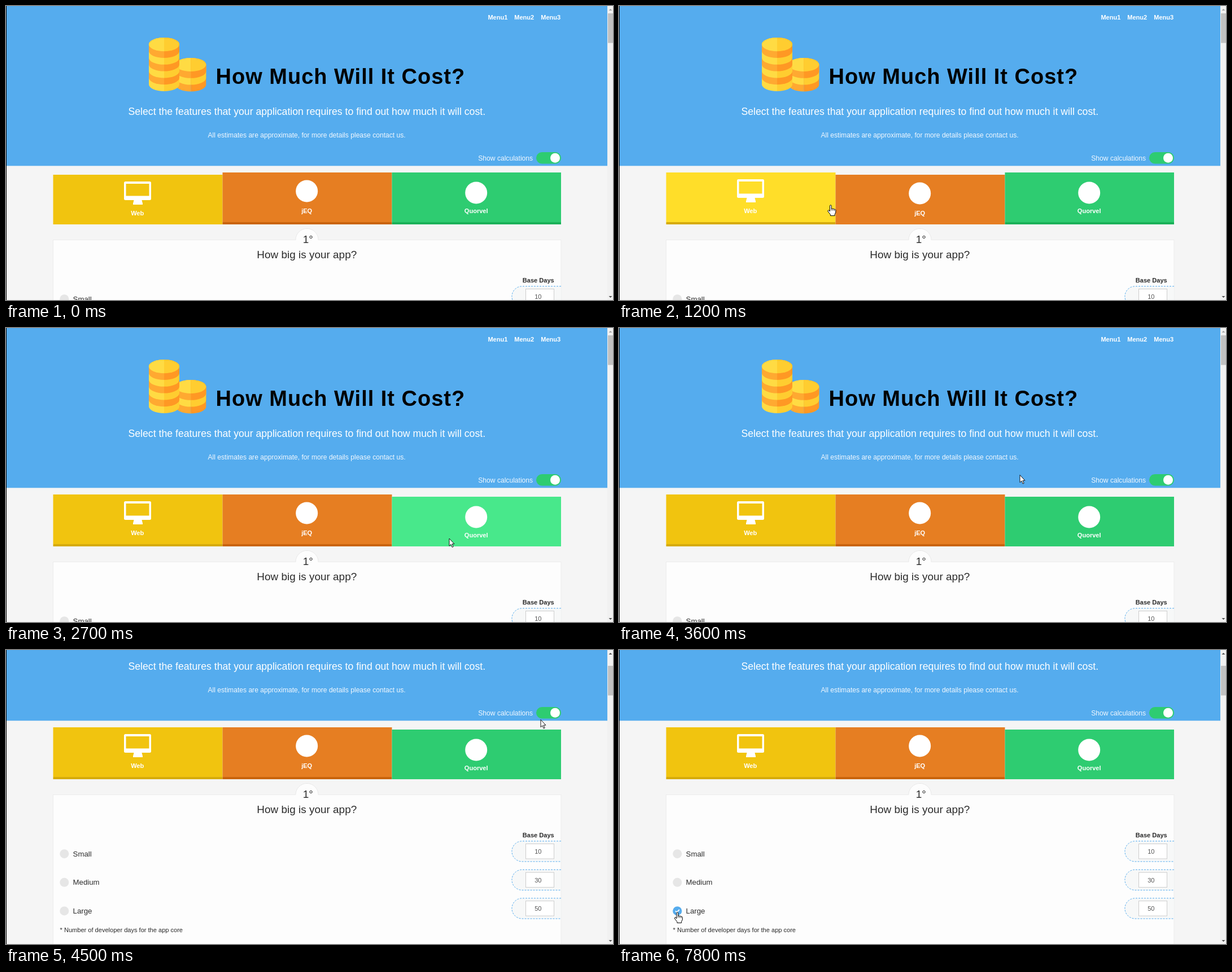
An HTML page for the animation above (8000 ms loop, 1075 px wide and 521 px high).

```html
<!DOCTYPE html>
<html lang="en">
<head>
<meta charset="utf-8">
<title>Cost calculator</title>
<style>
  html, body { margin: 0; width: 100%; height: 100%; overflow: hidden; background: #f5f5f5; }
  svg { display: block; width: 1075px; height: 521px; }
  text { font: 11.06px "Liberation Sans", Arial, sans-serif; fill: #2b2b2b; }
  .bold { font-weight: bold; }
  .light { fill: #fff; }
  .mid { text-anchor: middle; }
  .note { font-size: 12.1px; fill: #f2f8fe; }
  .label { font-size: 13.2px; }
  .big { font-size: 18.96px; }
</style>
</head>
<body>
<svg viewBox="0 0 1075 521">
  <rect width="1075" height="521" fill="#f5f5f5"/>
  <g id="page">
    <rect x="1" width="1064" height="283.3" fill="#55acee"/>
    <g class="menu">
      <text class="bold light" x="853.4" y="23.6">Menu1</text>
      <text class="bold light" x="900.2" y="23.6">Menu2</text>
      <text class="bold light" x="947.2" y="23.6">Menu3</text>
    </g>
    <g id="coins"></g>
    <text class="bold" x="371.5" y="138" style="font-size:38px;letter-spacing:1px;fill:#000">How Much Will It Cost?</text>
    <text class="mid light" x="532.8" y="192.6" style="font-size:17.68px">Select the features that your application requires to find out how much it will cost.</text>
    <text class="mid note" x="532.6" y="233">All estimates are approximate, for more details please contact us.</text>
    <text class="note" x="836.3" y="274">Show calculations</text>
    <rect id="track" x="939" y="259" width="44" height="20.5" rx="10.2"/>
    <rect id="knob" y="260.8" height="17" rx="8.5" fill="#fff"/>

    <g id="tabs"></g>

    <circle cx="533" cy="414.5" r="20" fill="#fdfdfd" stroke="#e6e6e6"/>
    <rect x="83.5" y="414.5" width="899.5" height="400" fill="#fdfdfd" stroke="#ececec"/>
    <circle cx="533" cy="414.5" r="19.5" fill="#fdfdfd"/>
    <text class="mid big" x="534.8" y="420">1°</text>
    <text class="mid big" x="532.8" y="447">How big is your app?</text>
    <g id="options"></g>
    <g id="days">
      <text class="bold" x="970.7" y="490.2" text-anchor="end">Base Days</text>
    </g>
    <g id="check">
      <circle cx="103.3" cy="620.4" r="8" fill="#55acee"/>
      <path d="M100 620.4l2.4 2.4l4.4 -4.7" fill="none" stroke="#fff" stroke-width="1.9"/>
    </g>
    <text x="95.6" y="657.6" font-style="italic">* Number of developer days for the app core</text>
  </g>

  <rect width="1" height="521" fill="#000"/>
  <rect x="1065" width="10" height="521" fill="#f1f1f1"/>
  <rect id="thumb" x="1066" width="9" height="52.5" fill="#c1c1c1"/>
  <path id="up" d="M1067.5 8h6l-3 -3z"/>
  <path d="M1067.5 514h6l-3 3z" fill="#505050"/>

  <g id="cursor" fill="#fff" stroke="#000" stroke-linejoin="round">
    <path id="arrow" stroke-width=".9" d="M0 0V13.2L3 10.4L5.2 15.5L7.2 14.6L5 9.7H9Z"/>
    <g id="hand">
      <path d="M-1.6 11V1.2a1.4 1.4 0 0 1 2.8 0V6.8a1.4 1.4 0 0 1 2.7 .3a1.4 1.4 0 0 1 2.6 .5a1.4 1.4 0 0 1 2.3 .9V13l-1.7 3.2V18.6H-.6V16.6L-4.9 11a1.5 1.5 0 0 1 2.2 -1.9z"/>
      <path d="M1.2 6.8V9.6M3.9 7.1V9.8M6.5 7.6V10" stroke-width=".8"/>
    </g>
  </g>
</svg>

<script>
const $ = id => document.getElementById(id);
const set = (id, attrs) => {
  for (const key in attrs) $(id).setAttribute(key, attrs[key]);
};
const show = (id, on) => set(id, { visibility: on ? 'visible' : 'hidden' });

const YELLOW = ['#ffdb43', '#ffcd30'], ORANGE = ['#ffa931', '#ff9824'];

// Each half of a stack has its own tone; bands are painted from the bottom up.
function coinStack(cx, top, bands) {
  const rx = 27, ry = 12, band = 11.8;
  const half = (side, y, color) => {
    const edge = cx + side * rx, sweep = side < 0 ? 0 : 1;
    return `<path fill="${color}" d="M${cx} ${top - ry}A${rx} ${ry} 0 0 ${sweep} ${edge} ${top}` +
      `V${y}A${rx} ${ry} 0 0 ${sweep} ${cx} ${y + ry}Z"/>`;
  };
  let out = '';
  for (let i = bands; i >= 0; i--) {
    const tone = i % 2 ? ORANGE : YELLOW;
    out += half(-1, top + i * band, tone[0]) + half(1, top + i * band, tone[1]);
  }
  return out;
}
$('coins').innerHTML = coinStack(327.3, 104, 3) + coinStack(280, 68.2, 6);

const tabs = [
  { name: 'Web', color: '#f1c40f', dark: '#d6ab0a', hover: '#ffde29',
    icon: '<path fill="#fff" fill-rule="evenodd" d="M211.5 307h43q2.5 0 2.5 2.5v28q0 2.5-2.5 2.5h-14l1.5 6v2h-17v-2l1.5-6h-15q-2.5 0-2.5-2.5v-28q0-2.5 2.5-2.5zM212.5 311v21.5h41v-21.5z"/>' },
  { name: 'jEQ', color: '#e67e22', dark: '#c9640c', hover: '#ff983c',
    icon: '<circle cx="532.7" cy="328" r="19.5" fill="#fff"/>' },
  { name: 'Quorvel', color: '#2ecc71', dark: '#1bb159', hover: '#48e88b',
    icon: '<circle cx="832.7" cy="331" r="19.5" fill="#fff"/>' }
];
$('tabs').innerHTML = tabs.map((tab, i) => {
  const x = 83.5 + 300 * i, width = i < 2 ? 300 : 299.5;
  return `<rect id="edge${i}" x="${x}" y="383" width="${width}" height="4" fill="${tab.dark}"/>
    <g id="tab${i}"><rect id="face${i}" x="${x}" y="295" width="${width}" height="88"/>${tab.icon}
    <text class="bold light mid" x="${232.7 + 300 * i}" y="367">${tab.name}</text></g>`;
}).join('');

[['Small', 10], ['Medium', 30], ['Large', 50]].forEach(([name, days], i) => {
  const y = 519.2 + 50.6 * i;
  $('options').innerHTML += `<circle cx="103.3" cy="${y}" r="8" fill="#e6e6e6"/>
    <text class="label" x="118.6" y="${y + 4.5}">${name}</text>`;
  $('days').innerHTML += `<path d="M983 ${y - 22.5}H914a18 18 0 0 0 0 36.2H983" fill="#f7f8f8"
      stroke="#55acee" stroke-dasharray="3 2"/>
    <rect x="920.5" y="${y - 17.7}" width="50" height="26.5" fill="#fff" stroke="#ccc"/>
    <text class="mid" x="942.3" y="${y}" dy="-.2" style="fill:#555">${days}</text>`;
});

// Cursor stops: step, x, y
const path = [
  [1, 470, 345], [2, 520, 350], [3, 470, 356], [4, 375, 353], [5, 330, 350], [6, 600, 350],
  [7, 800, 355], [8, 800, 360], [9, 785, 373], [12, 710, 260.5], [14, 710, 260.5],
  [15, 947, 123.5], [16, 965.5, 115], [20, 965.5, 115], [21, 494, 301.5], [24, 103.5, 465], [27, 103.5, 465]
];
function cursorAt(step) {
  const i = Math.max(1, path.findIndex(p => p[0] >= step));
  const [s0, x0, y0] = path[i - 1], [s1, x1, y1] = path[i];
  const k = Math.max(0, (step - s0) / (s1 - s0));
  return [x0 + (x1 - x0) * k, y0 + (y1 - y0) * k];
}

function draw(step) {
  const scroll = step < 13 ? 0 : step < 14 ? 79 : step < 15 ? 148 : 158;
  set('page', { transform: `translate(0 ${-scroll})` });
  set('thumb', { y: 13 + scroll * 0.095 });
  set('up', { fill: scroll ? '#505050' : '#a3a3a3' });

  const [x, y] = cursorAt(step);
  const pointing = step <= 8 || (step >= 16 && step <= 20) || step >= 24;
  set('cursor', { transform: `translate(${x} ${y})` });
  show('arrow', step > 0 && !pointing);
  show('hand', step > 0 && pointing);

  const selected = step < 2 ? 0 : step < 5 ? 1 : step < 7 ? 0 : 2;
  const hovered = step > 0 && step <= 10 ? Math.floor((x - 83) / 300) : -1;
  tabs.forEach((tab, i) => {
    set('tab' + i, { transform: `translate(0 ${i === selected ? 4 : 0})` });
    set('face' + i, { fill: i === hovered ? tab.hover : tab.color });
    show('edge' + i, i !== selected);
  });

  const off = step === 17 || step === 18, held = step === 19;
  set('track', { fill: off ? '#ddd' : '#2ecc71' });
  set('knob', { x: off ? 941 : held ? 957.5 : 964, width: held ? 23 : 17 });
  show('days', !off);
  show('check', step >= 25);
}

function tick() {
  draw(Math.floor(performance.now() % 8000 / 300));
  requestAnimationFrame(tick);
}
tick();
</script>
</body>
</html>
```
